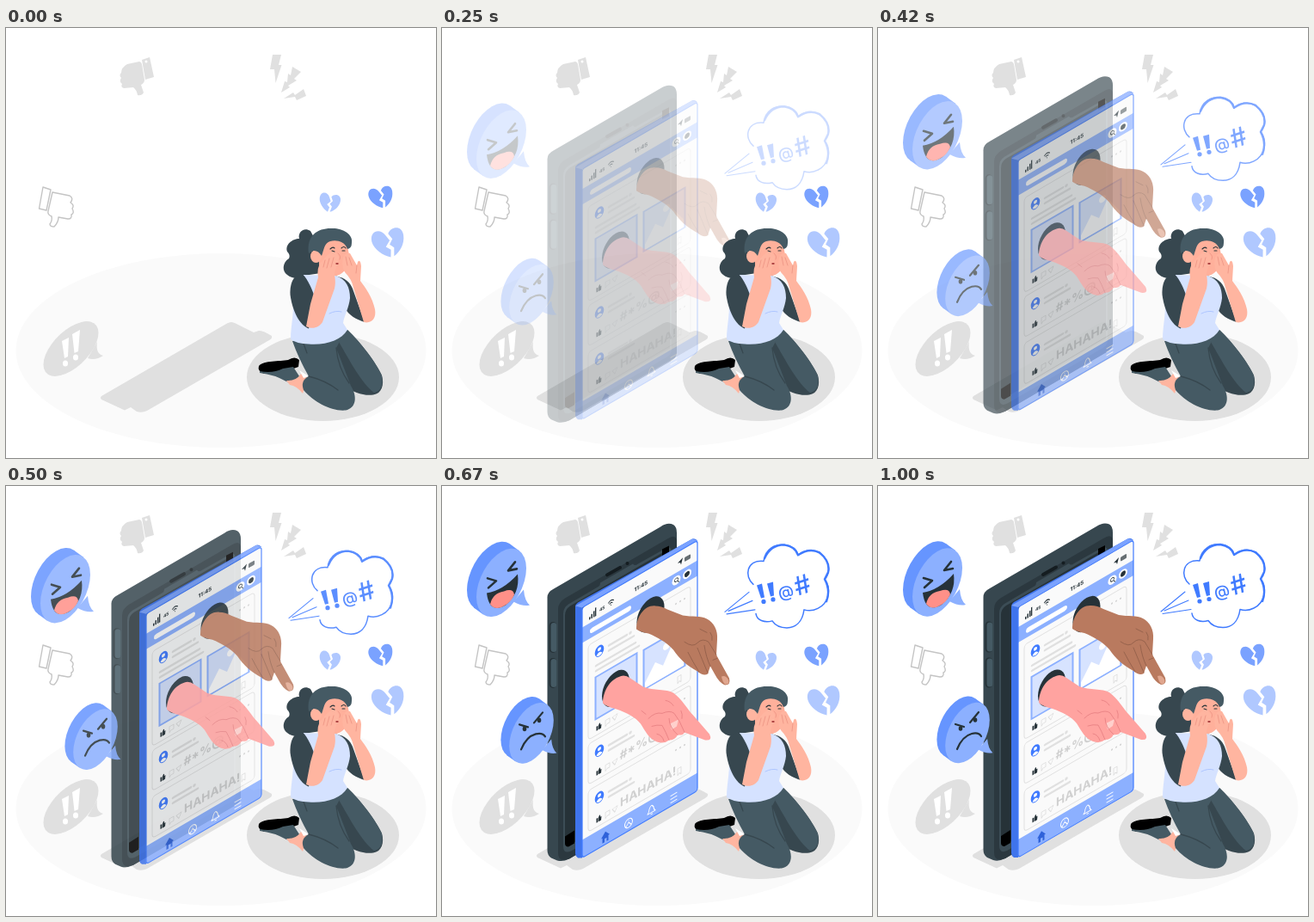
An HTML page that plays this animation: 500x500 px, repeating every 1.04 s.

```html
<!DOCTYPE html>
<html lang="en">
<head>
<meta charset="utf-8">
<style>
html, body { margin: 0; width: 100%; height: 100%; overflow: hidden; background: #fff; }
svg { display: block; width: 100vw; height: 100vh; }
text { font-family: Inter, Lato, sans-serif; font-weight: 700; }
.line { fill: none; stroke-linecap: round; stroke-linejoin: round; }
</style>
</head>
<body>
<svg viewBox="0 0 500 500">
<defs>
  <g id="heart">
    <path d="M-1.500-7C-5-14-15-13-14-3C-13 4-6 10 .5 12.5L1.500 6L-2.500 3L1.500-2Z"/>
    <path d="M1-8C4-14 14-14 14-5C14 3 9 9 3.500 12L4.500 4.500L1 1.500L4-3Z"/>
  </g>
  <g id="coin">
    <g fill="#6695ff">
      <ellipse rx="29" ry="36" transform="translate(-11 -8) skewY(-30)"/>
      <path d="M21-37L-21 37L-32 29L10-45Z"/>
    </g>
    <g fill="#8cb0ff">
      <ellipse rx="29" ry="36" transform="skewY(-30)"/>
      <path d="M26 8Q27 21 33 26Q25 28 14 22Z"/>
    </g>
  </g>
  <g id="who">
    <ellipse cx="20" rx="5.3" ry="6.5" fill="#407bff"/>
    <circle cx="20" cy="-2" r="2" fill="#fff"/>
    <path d="M16.5 4Q20-1 23.5 4Q20 7 16.5 4" fill="#fff"/>
    <path class="line" d="M31 0H52M31 6H60" stroke="#e0e0e0" stroke-width="2.6"/>
    <circle cx="56" r="1.8" fill="#e0e0e0"/>
    <path class="line" d="M109-3h0M114-3h0M119-3h0" stroke="#d0d0d0" stroke-width="2"/>
  </g>
  <g id="acts">
    <path d="M16.500-1h1.500v5h-1.500zM18.500 0L20-3Q21.500-3 21-.5H22.500L22 4H18.500Z" fill="#263238"/>
    <path class="line" d="M27-2h5v5h-3l-2 2zM35-1l6-1l-3 6zM111-4h4v8l-2-2l-2 2z" stroke="#dcdcdc" stroke-width=".8"/>
  </g>
</defs>

<!-- floor and shadows -->
<ellipse cx="250" cy="375" rx="238.500" ry="113" fill="#fafafa"/>
<g fill="#e0e0e0">
  <path d="M111 428L257 343.500Q262 340.500 267 343.500L288 354L294 352Q298 351 309 358Q310 361 306 363L164 445Q158 448 152 446L145 441L138 444.500L111 432Q109 430 111 428Z"/>
  <ellipse cx="368.500" cy="406" rx="88.500" ry="51"/>
</g>

<!-- grey symbols -->
<g fill="#e0e0e0">
  <ellipse rx="32" ry="26" transform="translate(75.500 373) skewY(-30)"/>
  <path d="M106 365Q104 379 113 381Q104 387 95 384Z"/>
  <path d="M158 37L167 34L172 57L162 60Z"/>
  <path d="M141 42L155 39Q157 39 158 42L161 60Q161 64 157 66L160 75Q158 79 153 78Q152 72 148 69L137 70Q133 69 135 65Q131 62 134 58Q131 55 134 52Q134 46 141 42Z"/>
  <path d="M310 31H320L317 43H320.500L313.500 64L312 48H307Z"/>
  <path d="M333 45L343 51L335 59L338 61L328 67L330 69L320 75L324 62L327 63L328 53L331 55Z"/>
  <path d="M346 71L349 79L338 84L336 80L323 82L334 75L336 78Z"/>
</g>
<circle cx="163" cy="39" r="1.500" fill="#fff"/>
<path d="M65 364L73 360L72 382L68 384ZM77 356L86 351L84 376L79.500 378Z" fill="#fff"/>
<ellipse cx="69" cy="390" rx="3" ry="3.500" fill="#fff"/>
<ellipse cx="81" cy="383" rx="3" ry="3.500" fill="#fff"/>
<path class="line" stroke="#c4c4c4" stroke-width="1.400" d="M43 185L52 188L47 212L38.500 210ZM54 191L74 195Q79 198 75 203Q80 206 77 210Q80 215 76 217Q77 222 72 222L61 220Q61 226 56 231Q51 231 51 228Q54 224 53 219Q48 217 49 213Z"/>

<!-- hearts -->
<use href="#heart" transform="translate(376 203) rotate(13) scale(.87)" fill="#b0c8ff"/>
<use href="#heart" transform="translate(436 197) rotate(-8)" fill="#7aa2ff"/>
<use href="#heart" transform="translate(444.500 250) rotate(-8) scale(1.340)" fill="#b0c8ff"/>

<!-- phone -->
<g class="rise">
  <path d="M122.500 130Q122 123 130 119L254 47Q262 41.500 269 44.500Q273 47 273 54V353Q273 360 266 364L148 433Q140 437 134 435L127 432Q122.500 429 122.500 423Z" fill="#37474f"/>
  <path d="M135 143Q135 135 143 130L262 61Q273 54 273 65V353Q273 360 266 364L148 433Q135 438 135 426Z" fill="#2b383f"/>
  <path d="M141 148Q141 141 147 137L181 117Q184 116 184 112L222 90Q224 93 228 90L260 72Q267 69 267 77V350Q267 356 262 359L150 424Q141 428 141 418Z" fill="#3c4d56"/>
  <path d="M143 150Q143 143 149 139L260 75Q265 73 265 79V349L150 416Q143 420 143 414Z" fill="#263238"/>
  <path class="line" d="M192 103L207 94.500M215.500 89.500h0" stroke="#151d21" stroke-width="4"/>
  <path class="line" d="M129 162V189M129 204V230" stroke="#263238" stroke-width="9"/>
  <path class="line" d="M130 162V189M130 204V230" stroke="#455a64" stroke-width="7"/>
  <path d="M143 407L154 400V415L147 419Q143 419 143 415ZM256 73L264 69V79L256 83Z" fill="#000"/>
</g>

<!-- floating screen -->
<g class="rise">
  <path d="M155 140Q155 137 158 135L291 61Q294 60 297 63L163 141V432L158 432Q155 430 155 427Z" fill="#3f74ec"/>
  <path d="M155 139L291 61L297 63L163 141Z" fill="#7aa2ff"/>
  <g transform="matrix(1 -.582 0 1 163 141)">
    <rect width="134" height="291" rx="3" fill="#fafafa"/>
    <path d="M0 23H134V41H0ZM0 270H134V288Q134 291 131 291H3Q0 291 0 288Z" fill="#8cb0ff"/>
    <rect width="134" height="291" rx="3" fill="none" stroke="#407bff" stroke-width="1.200"/>
    <g fill="#263238">
      <path d="M8 16h1.500v3H8zM10.500 14h1.500v5h-1.500zM13 12h1.500v7H13zM15 9h1.300v10H15z"/>
      <text x="20" y="16.500" font-size="5">45</text>
      <text x="60.500" y="17" font-size="6.300">11:45</text>
      <path d="M111 13L117 10L115 17L114 14Z"/>
      <rect x="119" y="11" width="7" height="5" rx="1" opacity=".7"/>
    </g>
    <path class="line" d="M30.500 12.500Q33.500 9.500 36.500 12.500M32 14.500Q33.500 13 35 14.500M33.500 16.500h0" stroke="#263238" stroke-width="1.100"/>
    <path class="line" d="M12 33H54" stroke="#fff" stroke-width="6"/>
    <circle cx="109.500" cy="32" r="5" fill="#fff"/>
    <circle cx="122" cy="32" r="5" fill="#fff"/>
    <path class="line" d="M111 33.500L112.500 35.500M111.500 31.500a2 2 0 1 1-4 0a2 2 0 1 1 4 0" stroke="#263238" stroke-width=".8"/>
    <circle cx="122" cy="32" r="3" fill="#263238"/>
    <g fill="none" stroke="#e0e0e0">
      <rect x="7" y="48" width="119" height="110" rx="4"/>
      <rect x="7" y="163" width="119" height="47" rx="4"/>
      <rect x="7" y="217" width="119" height="48" rx="4"/>
    </g>
    <use href="#who" y="62"/><use href="#who" y="178"/><use href="#who" y="232"/>
    <use href="#acts" y="149"/><use href="#acts" y="201"/><use href="#acts" y="256"/>
    <path class="line" d="M16 77H62M16 83H66" stroke="#e0e0e0" stroke-width="2.600"/>
    <g fill="#d7e3ff" stroke="#8cb0ff" stroke-width="2">
      <rect x="15.500" y="90" width="48" height="49"/>
      <rect x="71.500" y="91" width="48" height="46"/>
    </g>
    <path d="M73 130L85 113L94 122L104 105L118 127V136H73Z" fill="#fff"/>
    <circle cx="98" cy="102" r="4" fill="#fff"/>
    <g fill="#d0d0d0">
      <text x="43.500" y="203" font-size="14">#*%@</text>
      <text x="44" y="257.500" font-size="13.600">HAHAHA!</text>
    </g>
    <path d="M22 282L27 276L32 282H30.500V288H28.500V284H26V288H23.500V282Z" fill="#2f62d9"/>
    <path class="line" d="M58.500 282a4.500 5 0 1 1-9 0a4.500 5 0 1 1 9 0M51 285L54 281L57 285M54 279h0M76 285Q78 283 78 280Q80.500 274 83 280Q83 283 85 285ZM80 287h1.500M103 279H110M103 283H110M103 287H110" stroke="#fff" stroke-width="1"/>
  </g>
</g>

<!-- hands, each with the hole it reaches through -->
<g class="rise">
  <ellipse rx="16" ry="19" transform="translate(242.500 149) skewY(-30)" fill="#263238"/>
  <path d="M226 166C226 152 235 138 248 139Q255 139 262 143L280 150C291 152 301 150 308 154C316 158 321 167 320 178L319 196L334 223Q336 231 329 231Q322 228 317 218L312 209L309 218Q304 221 297 215C284 208 276 200 269 190C261 181 250 175 240 171Q230 169 226 166Z" fill="#b97a5f"/>
  <path d="M325 221Q330 219 333 225Q335 231 329 230Q326 227 325 221Z" fill="#e0a68e"/>
  <path class="line" d="M282 181Q292 188 297 182Q303 176 310 181L319 196M286 193Q291 203 299 216M297 188Q302 200 309 217M305 185Q307 199 312 209M312 170Q315 174 314 179M300 166L308 170M315 202L320 200" stroke="#94604b" stroke-width=".9"/>
</g>
<g class="rise">
  <ellipse rx="16" ry="19.500" transform="translate(202 235) skewY(-30)" fill="#263238"/>
  <path d="M187 252C187 238 196 222 211 220Q215 220 219 223L234 233C246 238 261 235 269 240C279 247 286 260 292 266L311 288Q315 296 306 295L282 286Q280 290 274 289Q271 295 264 295Q258 300 250 297C241 294 236 284 231 276C225 268 214 263 203 259Q191 256 187 252Z" fill="#ffa3a0"/>
  <path d="M265 276L275 271L273 279L267 283Z" fill="#ffd0cc"/>
  <path class="line" d="M240 270Q248 262 256 264Q265 260 270 264L276 273L282 286M244 279Q250 277 256 278Q260 285 264 295M250 288Q256 289 258 296M264 270Q264 280 274 289M278 261Q280 265 279 270M260 249Q266 250 269 255M232 261L237 265" stroke="#e88284" stroke-width=".9"/>
</g>

<!-- laughing face -->
<g class="rise">
  <use href="#coin" x="69" y="112"/>
  <path d="M52 124Q71 121 88 102Q91 124 74 138Q55 149 52 124Z" fill="#263238"/>
  <path d="M56 137Q59 124 72 122Q83 118 84 126Q80 135 72 139Q62 145 56 137Z" fill="#ff9088"/>
  <path class="line" d="M53 107L63 110L54 118M85 88L77 98L87 96" stroke="#263238" stroke-width="2.600"/>
</g>

<!-- angry face -->
<g class="rise">
  <use href="#coin" transform="translate(104 287) scale(.89)"/>
  <path class="line" d="M92 306Q98 291 109 288Q117 286 120 291M90 277L100 280M107 275L117 263" stroke="#263238" stroke-width="2.200"/>
  <ellipse cx="96" cy="282" rx="2.300" ry="2.800" fill="#263238"/>
  <ellipse cx="113" cy="272" rx="2.300" ry="2.800" fill="#263238"/>
</g>

<!-- swearing cloud -->
<g class="rise">
  <path d="M362 114C351 105 354 85 374 87C376 72 388 67 398 68C407 69 413 74 414 80C428 67 450 78 449.500 97Q449 104 445 108C453 118 450 136 437 142Q429 146 421 143.500C419 158 411 164.500 401 164.500C393 164.500 387 161 384 156.500C375 159 366 156 365 148Z" fill="#fff"/>
  <path class="line" d="M362 114C351 105 354 85 374 87C376 72 388 67 398 68C407 69 413 74 414 80C428 67 450 78 449.500 97Q449 104 445 108C453 118 450 136 437 142Q429 146 421 143.500C419 158 411 164.500 401 164.500C393 164.500 387 161 384 156.500C375 159 366 156 365 148" stroke="#407bff" stroke-width="1.500"/>
  <path class="line" d="M375 84Q382 68 398 68Q411 70 414 80Q427 71 439 77Q452 88 449 100L445 108Q452 121 447 134" stroke="#407bff" stroke-width="2.400"/>
  <path class="line" d="M329 146L357 123M333 145L361 133M331 148.500L364 143.500" stroke="#407bff" stroke-width="1.100"/>
  <g fill="#407bff">
    <path d="M366 115L372 113L375 129L371 130ZM378 113L385 111L386 127L382 128Z"/>
    <circle cx="374" cy="134" r="2.600"/><circle cx="385" cy="131.500" r="2.600"/>
    <text transform="translate(392.500 131) rotate(-14)" font-size="18.500" style="font-weight:500">@</text>
    <text transform="translate(413 127.500) rotate(-18)" font-size="30" style="font-weight:500">#</text>
  </g>
</g>

<!-- girl -->
<g>
  <path d="M294 393C300 386 318 388 328 386Q336 381 341 386L340 394L326 399L300 402Q292 399 294 393Z" fill="#000"/>
  <path d="M295 399Q310 402 322 396L334 394L343 408Q335 415 326 411Q312 403 295 401Z" fill="#455a64"/>
  <path d="M326 410Q337 411 343 402L351 406L345 425Q338 416 330 415Z" fill="#ffb5a0"/>
  <path d="M341 398L352 405L346 407Z" fill="#fff"/>
  <path d="M370 360L397 351C413 366 430 389 437 404C440 415 437 425 427 426.500C416 428 404 424 394 416Z" fill="#37474f"/>
  <path d="M392 352L397 351C413 366 430 389 437 404Q440 421 428 424C414 414 398 384 387 365Z" fill="#455a64"/>
  <path d="M333 364Q340 384 352 405Q342 410 346 421C358 435 378 446 395 444.500C407 442 409 429 401 416L384 372L393 355Z" fill="#455a64"/>
  <path class="line" d="M352 405Q372 410 386 421M346 367L350 378M384 372Q386 395 399 413" stroke="#37474f" stroke-width="1.300"/>

  <path d="M354 236C346 231 339 238 341 245C333 245 324 252 327 260Q331 264 329 268C321 273 321 283 327 287Q336 294 346 288L366 285V258Z" fill="#37474f"/>
  <path d="M364 250C372 243 392 246 397 253L399 264C400 280 390 289 378 289L364 287Z" fill="#ffb09b"/>
  <ellipse cx="360.500" cy="265.500" rx="6.500" ry="7.500" fill="#ffb5a0"/>
  <path d="M352 262C349 240 364 232 380 233C392 233 404 240 402 250Q402 256 397 257C394 248 384 246 377 248C370 250 370 257 367 265Q363 258 357 259Q353 261 352 262Z" fill="#455a64"/>
  <path d="M381 288C395 290 400 296 403 303L417 342C407 339 399 334 394 326Z" fill="#37474f"/>
  <path d="M346 287L383 288C396 292 400 302 400 314C399 325 393 335 392 343L397 351C390 363 372 369 352 367.500Q338 367 331 362C331 345 336 330 333 310Z" fill="#d5e2ff"/>
  <path d="M345 286.500C334 286 330 297 330.500 310C333 330 342 346 352 349.500L361 318C356 304 351 292 345 286.500Z" fill="#37474f"/>
  <path d="M349 347C357 351 364 348 368 342L382 303C384 295 382 289 382 285L387 269Q387 262 381 260Q375 261 366 273Q361 279 363 290L354 321Z" fill="#ffb5a0"/>
  <path d="M416 342C425 344 431 338 429 327C426 313 418 302 412 294L413 277Q412 268 409 272L408 276L400 262Q395 261 392 267C390 274 392 280 394 284Q402 292 404 302Z" fill="#ffb5a0"/>
  <path class="line" d="M371 270L369 278M376 268L373 279M381 267L378 278M395 266L397 276M399 267L402 276M408 276L407 285M386 262Q390 265 388 269" stroke="#eb9483" stroke-width=".8"/>
  <path class="line" d="M377 257Q380 254 382 256M390 256Q393 253 395 256M379 259L382 260M391 259L394 259" stroke="#263238" stroke-width="1.100"/>
  <ellipse cx="385" cy="274" rx="1.800" ry="1" fill="#a83d3d"/>
  <path class="line" d="M376 332Q384 328 390 330" stroke="#aec6ff" stroke-width="1"/>
</g>
</svg>
<script>
const LOOP = 1040, STEPS = 25, RISE = 30;
const parts = document.querySelectorAll('.rise');
const cubic = (s, a, b) => 3 * (1 - s) ** 2 * s * a + 3 * (1 - s) * s * s * b + s ** 3;

// cubic-bezier(.36, -.01, .5, 1.38), solved by bisection
function ease(t) {
  let lo = 0, hi = 1;
  for (let i = 0; i < 24; i++) {
    const mid = (lo + hi) / 2;
    if (cubic(mid, .36, .5) < t) lo = mid; else hi = mid;
  }
  return cubic(lo, -.01, 1.38);
}

function draw() {
  const ms = performance.now() % LOOP;
  // 24 pictures a second, like film
  const step = Math.min(STEPS - 1, Math.floor((ms + 4) * STEPS / LOOP));
  const k = step < 2 ? 0 : ease(step / (STEPS - 1));
  for (const part of parts) {
    part.setAttribute('transform', `translate(0 ${RISE * (1 - k)})`);
    part.setAttribute('opacity', Math.max(0, Math.min(1, k * 1.15)));
  }
  requestAnimationFrame(draw);
}
draw();
</script>
</body>
</html>
```
